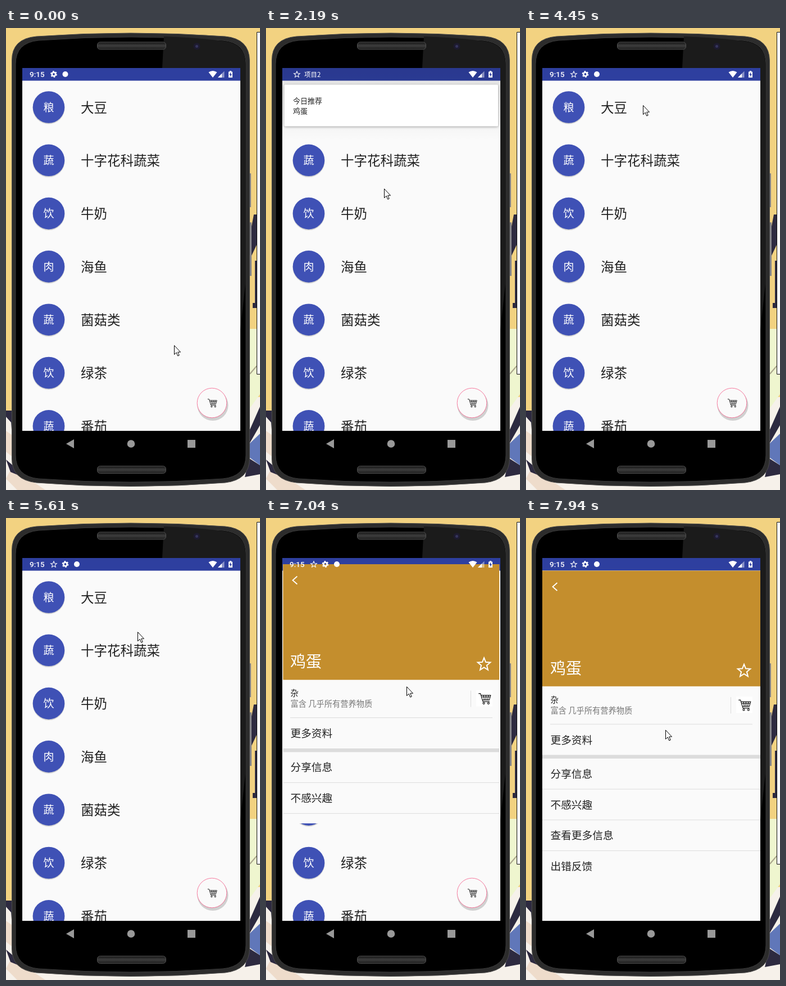
Recreate the animation shown at these times as an HTML page. Size 452 px wide and 820 px high, loop 8 s.

```html
<!DOCTYPE html>
<html lang="zh-CN">
<head>
<meta charset="utf-8">
<title>今日推荐</title>
<style>
  html, body { margin: 0; width: 100%; height: 100%; overflow: hidden; }
  svg { display: block; width: 100vw; height: 100vh; font-family: "Noto Sans CJK SC", "Noto Sans CJK", "Noto Sans", sans-serif; }
  .clock { font: 500 13.5px Roboto, sans-serif; }
  .line { fill: none; stroke: #dcdcdc; }
  .card { filter: drop-shadow(0 1px 2px rgba(0, 0, 0, .35)); }
</style>
</head>
<body>
<svg viewBox="0 0 452 820">
  <defs>
    <path id="star" fill="none" stroke="#fff"/>
    <g id="cart" fill="none" stroke="#151515" stroke-width="1.2">
      <path d="M-11-9H-7.500L-3 5.500H9M-6.500-6H11L8.500 2.500H-4M-5.500-3H10M-2-6L-.5 2.500M2.500-6V2.500M7-6L5.500 2.500"/>
      <circle cx="-1.500" cy="8.500" r="1.600"/><circle cx="7" cy="8.500" r="1.600"/>
    </g>
    <linearGradient id="scrimFill" x2="0" y2="1">
      <stop stop-opacity=".1"/><stop offset="1" stop-opacity="0"/>
    </linearGradient>
    <linearGradient id="grille" x2="0" y2="1">
      <stop stop-color="#171717"/><stop offset=".5" stop-color="#3d3d3d"/><stop offset="1" stop-color="#1c1c1c"/>
    </linearGradient>
    <clipPath id="screen"><path d="M29 71H417V715H29Z"/></clipPath>
    <clipPath id="belowBar"><path d="M29 93.600H417V715H29Z"/></clipPath>
    <clipPath id="pageClip"><rect id="pageWindow" y="71"/></clipPath>
  </defs>

  <!-- Desktop -->
  <path fill="#f2d281" d="M0 0H452V820H0Z"/>
  <path fill="#2d2a40" d="M446 331H441L437 352V404L446 385ZM443 413H446V497H439V488H443ZM0 679H11L14 720H0Z"/>
  <path fill="#f6f1ea" d="M0 690L9 700L14 765L60 800H390L432 770V655H452V820H0Z"/>
  <path fill="#eedccb" d="M0 715L10 722V760L0 752ZM10 780L70 820H20L0 800Z"/>
  <path fill="#2d2a40" d="M0 766L14 778L30 797L8 788ZM452 672L433 715V738L452 705ZM433 764L452 776V792L425 797Z"/>
  <path fill="#eff6cf" d="M430 534H452V650L430 680Z"/>
  <path fill="#6077b9" d="M433 738L452 720V776L433 762Z"/>
  <path d="M434 614L446 600" stroke="#aaa58c" stroke-width="2"/>
  <path fill="#fbfbfb" stroke="#111" d="M446.500 7.500H460V614.500H446.500Z"/>

  <!-- Handset -->
  <path fill="#85858a" d="M431 258H436V318H431ZM431 345H437V440H431Z"/>
  <path fill="#2c2c2c" stroke="#4b4b4b" d="M10.500 58Q10 19 54 15Q222 3 390 15Q433 19 433.500 58V764Q433 802 390 807Q222 820 54 807Q10 802 10.500 764Z"/>
  <path fill="#000" stroke="#3a3a3a" d="M17 64Q17 26 58 22Q222 10 386 22Q427 26 427 64V758Q427 796 386 800Q222 812 58 800Q17 796 17 758Z"/>
  <path fill="#1b1b1b" d="M281 15Q340 17 386 23Q426 27 426.500 64V450L417 535V71H278Z"/>
  <g fill="url(#grille)" stroke="#505050">
    <rect x="162.500" y="25" width="122" height="13" rx="5"/><rect x="162.500" y="777.500" width="122" height="13" rx="5"/>
  </g>
  <circle cx="339.500" cy="32.500" r="6" fill="#1d1b2f"/><circle cx="339.500" cy="32.500" r="2.500" fill="#35345c"/>
  <path fill="#000" d="M29 715H417V765H29Z"/>
  <g fill="#999">
    <path d="M107 738L121 730V746Z"/><circle cx="222.500" cy="738" r="6.800"/><path d="M323 731H337V745H323Z"/>
  </g>

  <g clip-path="url(#screen)">
    <path fill="#fafafa" d="M29 71H417V715H29Z"/>
    <g id="list"></g>
    <circle cx="368" cy="669.500" r="27.500" opacity=".17"/>
    <circle cx="366.500" cy="665.500" r="26.300" fill="#fafafa" stroke="#f45b87" stroke-width=".8"/>
    <use href="#cart" transform="translate(367 665.500) scale(.75)"/>
    <path fill="#2e3f9f" d="M29 71H417V93.600H29Z"/>

    <path id="scrim" fill="url(#scrimFill)" d="M29 71H417V200H29Z"/>
    <g clip-path="url(#belowBar)">
      <g id="card">
        <rect class="card" x="32.500" y="100.500" width="380.500" height="74" rx="2" fill="#fff"/>
        <g font-size="13" fill="#222"><text x="48" y="134">今日推荐</text><text x="48" y="152">鸡蛋</text></g>
      </g>
    </g>

    <g clip-path="url(#pageClip)">
      <g id="page">
        <path fill="#fafafa" d="M29 93.600H417V760H29Z"/>
        <path fill="#c48e2d" d="M29 93.600H417V298.700H29Z"/>
        <path fill="none" stroke="#fff" stroke-width="1.800" d="M55.500 115L47.500 122L55.500 129"/>
        <text x="43" y="276.500" font-size="28" fill="#fff">鸡蛋</text>
        <use href="#star" transform="translate(388 271.500) scale(1.180)" stroke-width="1.700"/>
        <text x="43.500" y="328" font-size="14.250" fill="#222">杂</text>
        <text x="43.500" y="347" font-size="14.250" fill="#777">富含 几乎所有营养物质</text>
        <path class="line" d="M364.500 318V347M43 366H403"/>
        <path fill="#fff" d="M374 317H403V346H374Z"/>
        <use href="#cart" transform="translate(389 332) scale(.98)"/>
        <path fill="#dcdcdc" d="M29 420.500H417V427H29Z"/>
        <g font-size="18.700" fill="#222"><text x="43.500" y="401">更多资料</text><g id="actions"></g></g>
      </g>
    </g>

    <!-- Status bar -->
    <g fill="#fff">
      <text id="clock" class="clock" x="42" y="87">9:15</text>
      <g id="icons">
        <g fill="none" stroke="#fff">
          <circle cx="85" cy="82" r="3.200" stroke-width="2.600"/>
          <circle cx="85" cy="82" r="4.900" stroke-width="2" stroke-dasharray="2.600 2.531"/>
        </g>
        <circle cx="105.500" cy="82" r="5"/>
      </g>
      <use id="statusStar" href="#star" stroke-width="1.800"/>
      <text id="ticker" x="68" y="86.500" font-size="11.500" font-weight="500">项目2</text>
      <path d="M360.500 78.500Q368 73.500 375.500 78.500L368 88Z"/>
      <path opacity=".45" d="M377 88L388.500 76.500V88Z"/><path d="M377 88L384 81V88Z"/>
      <path d="M396 77.500H398V76H401V77.500H403V88H396Z"/>
      <path fill="#2e3f9f" d="M400.300 78.500L397.300 83H399V86.500L402 82H400.300Z"/>
    </g>
  </g>

  <path id="cursor" fill="#fff" stroke="#000" stroke-linejoin="round" d="M.5.5V16.500L4.200 13L6.700 19L9.200 18L6.700 12.200H11.500Z"/>
</svg>
<script>
const LOOP = 8000;
const el = id => document.getElementById(id);

const foods = ["粮 大豆", "蔬 十字花科蔬菜", "饮 牛奶", "肉 海鱼", "蔬 菌菇类", "饮 绿茶", "蔬 番茄"];
el("list").innerHTML = foods.map((food, i) => {
  const [kind, name] = food.split(" ");
  return `<g transform="translate(0 ${140.5 + i * 94.3})">
    <circle cx="76" cy="1.5" r="28.5" opacity=".16"/>
    <circle cx="76" r="28.3" fill="#3f51b5"/>
    <text x="76" y="7.3" font-size="19" fill="#fff" text-anchor="middle">${kind}</text>
    <text x="133" y="9.2" font-size="23.5" fill="#212121">${name}</text>
  </g>`;
}).join("");

const actions = ["分享信息", "不感兴趣", "查看更多信息", "出错反馈"];
el("actions").innerHTML = actions.map((label, i) => `
  <g transform="translate(0 ${454 + i * 54.7})">
    <text x="43.5" y="7">${label}</text>
    ${i ? '<path class="line" d="M29-27.5H417"/>' : ""}
  </g>`).join("");

const starPoints = Array.from({ length: 10 }, (_, i) => {
  const radius = i % 2 ? 4.4 : 10, angle = i * Math.PI / 5;
  return `${radius * Math.sin(angle)} ${-radius * Math.cos(angle)}`;
});
el("star").setAttribute("d", `M${starPoints.join("L")}Z`);

// Progress from 0 to 1 between two times, and its easings.
const ramp = (t, from, to) => Math.min(1, Math.max(0, (t - from) / (to - from)));
const easeOut = k => 1 - (1 - k) ** 2;
const easeInOut = k => k * k * (3 - 2 * k);

// Cursor stops: time, x, y.
const stops = [
  [300, 299, 563], [790, 290, 554], [1690, 242, 360], [2190, 210, 285], [2590, 203, 199],
  [3490, 208, 137], [4510, 208, 137], [5610, 234, 202], [6640, 251, 264], [7940, 248, 376]
];
function cursorAt(t) {
  let [, x, y] = stops[0];
  for (let i = 1; i < stops.length; i++) {
    const [from, x0, y0] = stops[i - 1], [to, x1, y1] = stops[i];
    const k = ramp(t, from, to);
    x += (x1 - x0) * k;
    y += (y1 - y0) * k;
  }
  return [Math.round(x), Math.round(y)];
}

const fade = (id, opacity) => el(id).setAttribute("opacity", opacity);
const move = (id, x, y, extra = "") => el(id).setAttribute("transform", `translate(${x} ${y}) ${extra}`);

function drawNotification(t) {
  const shown = easeOut(ramp(t, 20, 430)) * (1 - ramp(t, 3950, 4240));
  move("card", 0, -85 * (1 - shown));
  fade("card", shown);
  fade("scrim", shown);

  const ticker = ramp(t, 200, 380);
  fade("ticker", ticker * (1 - ramp(t, 3540, 3690)));
  fade("statusStar", ticker);
  move("statusStar", 55 + 30 * ramp(t, 3540, 3840), 82.5, "scale(.57)");

  const icons = 1 - ramp(t, 20, 180) + ramp(t, 3915, 4190);
  fade("clock", icons);
  fade("icons", icons);
  move("icons", t < 3000 ? 0 : 20.5, 0);
}

function drawPage(t) {
  const progress = ramp(t, 6390, 7840);
  const rest = 1 - easeInOut(progress);
  const left = 29 + 2.3 * rest, right = 417 - 3.2 * rest;
  const pageWindow = el("pageWindow");
  pageWindow.setAttribute("x", left);
  pageWindow.setAttribute("width", progress > 0 ? right - left : 0);
  pageWindow.setAttribute("height", 74 + 570 * easeOut(progress));
  move("page", 0, -20 * rest);
}

const started = performance.now();
function draw() {
  const t = (performance.now() - started) % LOOP;
  move("cursor", ...cursorAt(t));
  drawNotification(t);
  drawPage(t);
  requestAnimationFrame(draw);
}
draw();
</script>
</body>
</html>
```
